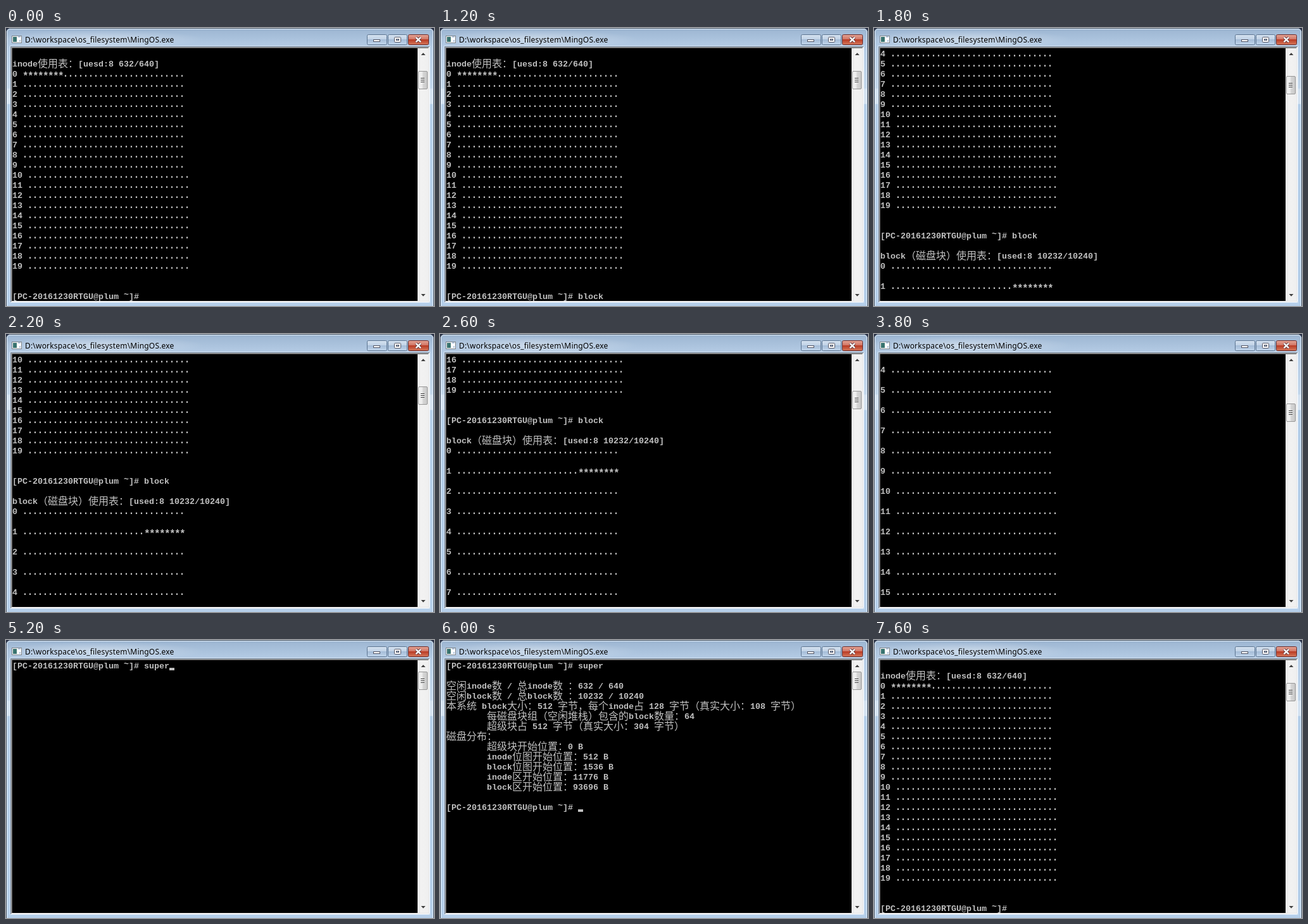
Write an HTML page that moves like this. It is 676 by 440 pixels and loops after 7.8 s.

```html
<!DOCTYPE html>
<html lang="zh">
<head>
<meta charset="utf-8">
<title>Console</title>
<style>
  html, body { margin: 0; width: 100%; height: 100%; overflow: hidden; background: #1f4b80; }
  svg { display: block; }
  #screen text { font: bold 13.3333px "Liberation Mono", monospace; fill: #c0c0c0; white-space: pre; }
  #screen .cjk { font: 300 16px "Noto Sans CJK SC", "Noto Sans CJK", sans-serif; }
  #screen .dots { font: bold 13.3333px "DejaVu Sans Mono", monospace; letter-spacing: -.027px; }
  #screen .stars { font-size: 16px; letter-spacing: -1.6px; }
  .title { font: 12px "Noto Sans", sans-serif; letter-spacing: .19px; fill: #000; }
</style>
</head>
<body>
<svg width="676" height="440" viewBox="0 0 676 440">
  <defs>
    <linearGradient id="glass" x2="0" y2="1">
      <stop offset="0" stop-color="#9cb5d1"/>
      <stop offset=".07" stop-color="#b7cee7"/>
      <stop offset=".21" stop-color="#c4d8ec"/>
      <stop offset=".214" stop-color="#d6e4f2"/>
      <stop offset=".266" stop-color="#d6e4f2"/>
      <stop offset=".267" stop-color="#b5cfea"/>
      <stop offset="1" stop-color="#b5cfea"/>
    </linearGradient>
    <radialGradient id="glow">
      <stop offset="0" stop-color="#fff" stop-opacity=".4"/>
      <stop offset="1" stop-color="#fff" stop-opacity="0"/>
    </radialGradient>
    <linearGradient id="btn" x2="0" y2="1">
      <stop offset="0" stop-color="#d5e2f0"/>
      <stop offset=".48" stop-color="#c0d2e6"/>
      <stop offset=".5" stop-color="#a5bdd8"/>
      <stop offset="1" stop-color="#c2d6ec"/>
    </linearGradient>
    <linearGradient id="red" x2="0" y2="1">
      <stop offset="0" stop-color="#e5a596"/>
      <stop offset=".48" stop-color="#d07362"/>
      <stop offset=".5" stop-color="#bb3c25"/>
      <stop offset="1" stop-color="#d5795c"/>
    </linearGradient>
    <linearGradient id="track">
      <stop offset="0" stop-color="#e6e6e6"/>
      <stop offset=".3" stop-color="#f2f2f2"/>
      <stop offset="1" stop-color="#f0f0f0"/>
    </linearGradient>
    <linearGradient id="knob">
      <stop offset="0" stop-color="#f6f6f6"/>
      <stop offset=".48" stop-color="#e8e8e8"/>
      <stop offset=".5" stop-color="#d6d6d6"/>
      <stop offset="1" stop-color="#c8c8c8"/>
    </linearGradient>
  </defs>

  <!-- desktop and window frame -->
  <rect width="676" height="120" fill="#2a3045"/>
  <rect x=".5" y=".5" width="675" height="450" rx="6" fill="url(#glass)" stroke="#36475c"/>
  <path d="M1.5 440V7Q1.5 1.5 7 1.5H669Q674.5 1.5 674.5 7V440" fill="none" stroke="#eaf2fa"/>
  <ellipse cx="148" cy="18" rx="165" ry="15" fill="url(#glow)"/>

  <!-- title bar -->
  <rect x="9.5" y="12.5" width="15" height="11" fill="#fff" stroke="#7d858c"/>
  <rect x="11" y="14" width="6" height="8" fill="#39736f"/>
  <path d="M19 14h4M22 19v3" stroke="#6d8fc0"/>
  <text class="title" x="30" y="23">D:\workspace\os_filesystem\MingOS.exe</text>
  <g stroke="#5d7591">
    <rect x="570.5" y="10.5" width="31" height="16" rx="2" fill="url(#btn)"/>
    <rect x="603.5" y="10.5" width="30" height="16" rx="2" fill="url(#btn)"/>
    <rect x="635.5" y="10.5" width="32" height="16" rx="2" fill="url(#red)" stroke="#6a2a2a"/>
  </g>
  <g fill="#fff" stroke="#535666">
    <rect x="580.5" y="18.5" width="10" height="3"/>
    <rect x="613.5" y="14.5" width="10" height="8" rx="1"/>
    <rect x="616.5" y="17.5" width="4" height="2" fill="#a5bdd8"/>
  </g>
  <path d="M647.5 14.8L655 22.2M655 14.8L647.5 22.2" stroke="#5c3a40" stroke-width="4.2"/>
  <path d="M647.5 14.8L655 22.2M655 14.8L647.5 22.2" stroke="#fff" stroke-width="2.4"/>

  <!-- client area with its sunken edge -->
  <g fill="none">
    <rect x="6.5" y="28.5" width="663" height="406" stroke="#e3edf7" stroke-opacity=".7"/>
    <rect x="7.5" y="29.5" width="661" height="404" stroke="#6f8298"/>
    <path d="M8.5 433V30.5H668" stroke="#a0a0a0"/>
    <path d="M9.5 432V31.5H667" stroke="#696969"/>
    <path d="M9 432.5H667.5V31" stroke="#e3e3e3"/>
    <path d="M8 433.5H668.5V30" stroke="#fff"/>
  </g>
  <rect x="10" y="32" width="640" height="400"/>
  <rect x="650" y="32" width="17" height="400" fill="url(#track)"/>
  <path d="M655.5 43L659 39.3L662.5 43ZM655.5 421L659 424.7L662.5 421Z" fill="#404040"/>
  <g id="thumb">
    <rect x="651.5" y=".5" width="14" height="28" rx="1.5" fill="url(#knob)" stroke="#979797"/>
    <path d="M655 11.5h6M655 14.5h6M655 17.5h6" stroke="#3c3c3c"/>
    <path d="M655 12.5h6M655 15.5h6M655 18.5h6" stroke="#fff" stroke-opacity=".7"/>
  </g>
  <g id="screen"></g>
</svg>

<script>
const LOOP = 7800, TICK = 200, ROWS = 25;
const PROMPT = '[PC-20161230RTGU@plum ~]# ';
const PAD = ' '.repeat(8), STARS = '*'.repeat(8);
const screenEl = document.getElementById('screen');
const thumbEl = document.getElementById('thumb');

const dots = n => '.'.repeat(n);
const tableRow = (i, cells = dots(32)) => `${i} ${cells}`;

// The whole session; the window shows its last 25 lines.
const lines = [
  PROMPT + 'super', '',
  '空闲inode数 / 总inode数 ：632 / 640',
  '空闲block数 / 总block数 ：10232 / 10240',
  '本系统 block大小：512 字节，每个inode占 128 字节（真实大小：108 字节）',
  PAD + '每磁盘块组（空闲堆栈）包含的block数量：64',
  PAD + '超级块占 512 字节（真实大小：304 字节）',
  '磁盘分布：',
  PAD + '超级块开始位置：0 B',
  PAD + 'inode位图开始位置：512 B',
  PAD + 'block位图开始位置：1536 B',
  PAD + 'inode区开始位置：11776 B',
  PAD + 'block区开始位置：93696 B',
  '',
  PROMPT + 'inode', '',
  'inode使用表：[uesd:8 632/640]'
];
for (let i = 0; i < 20; i++) lines.push(i ? tableRow(i) : tableRow(0, STARS + dots(24)));
lines.push('', '', PROMPT + 'block', '', 'block（磁盘块）使用表：[used:8 10232/10240]');
for (let i = 0; i < 20; i++) lines.push(i === 1 ? tableRow(1, dots(24) + STARS) : tableRow(i), '');

const SUPER_AT = 0, INODE_AT = 14, BLOCK_AT = 39, BLOCK_ROWS = 42;

// Finished line count, the line being written, and cursor visibility.
function stateAt(t) {
  const typing = (end, word, n, cursor = false) => ({ end, last: PROMPT + word.slice(0, n), cursor });
  const keys = [0, 1, 2, 4, 5];
  const typed = start => keys[Math.max(0, Math.min(4, (t - start) / TICK + 1))];

  if (t < 1400) return typing(BLOCK_AT, 'block', Math.max(0, t / TICK - 1), t === 400 || t === 600);
  if (t < 4200) {
    const row = t < 1800 ? 0 : Math.round(1 + (t - 1800) * .007);
    return { end: BLOCK_ROWS + 2 * row + 1, last: '' };
  }
  if (t < 5400) return typing(SUPER_AT, 'super', typed(4600), t === 5200);
  if (t < 7400) return typing(INODE_AT, 'inode', typed(6400), t >= 6000 && t < 6400);
  if (t < 7600) return { end: 31, last: '' };
  return typing(BLOCK_AT, 'block', 0);
}

// Each kind of run: pattern, class, cell width, vertical shift.
const KINDS = [
  [/^\*/, 'stars', 8, 4],
  [/^\./, 'dots', 8, 0],
  [/^~/, 'tilde', 8, -3],
  [/^[ -~]/, 'latin', 8, 0],
  [/^/, 'cjk', 16, 1]
];

function lineMarkup(line, row) {
  const base = 45 + row * 16;
  let x = 10, out = '';
  for (const [run] of line.matchAll(/\*+|\.+|~|[ -)+-\-\/-}]+|[^ -~]+/g)) {
    const [, name, cell, shift] = KINDS.find(([pattern]) => pattern.test(run));
    out += `<text xml:space="preserve" class="${name}" x="${x}" y="${base + shift}">${run}</text>`;
    x += run.length * cell;
  }
  return out;
}

function draw(t) {
  const { end, last, cursor } = stateAt(t);
  const all = [...lines.slice(0, end), last];
  const top = Math.max(0, all.length - ROWS);
  const view = all.slice(top);
  let markup = view.map(lineMarkup).join('');
  if (cursor) {
    markup += `<rect x="${10 + last.length * 8}" y="${28 + view.length * 16}" width="8" height="4" fill="#c0c0c0"/>`;
  }
  screenEl.innerHTML = markup;
  thumbEl.setAttribute('transform', `translate(0 ${Math.round(50 + top * 1.225)})`);
}

const start = performance.now();
let shown = -1;
function frame() {
  const t = Math.floor((performance.now() - start) % LOOP / TICK) * TICK;
  if (t !== shown) draw(shown = t);
  requestAnimationFrame(frame);
}
frame();
</script>
</body>
</html>
```
